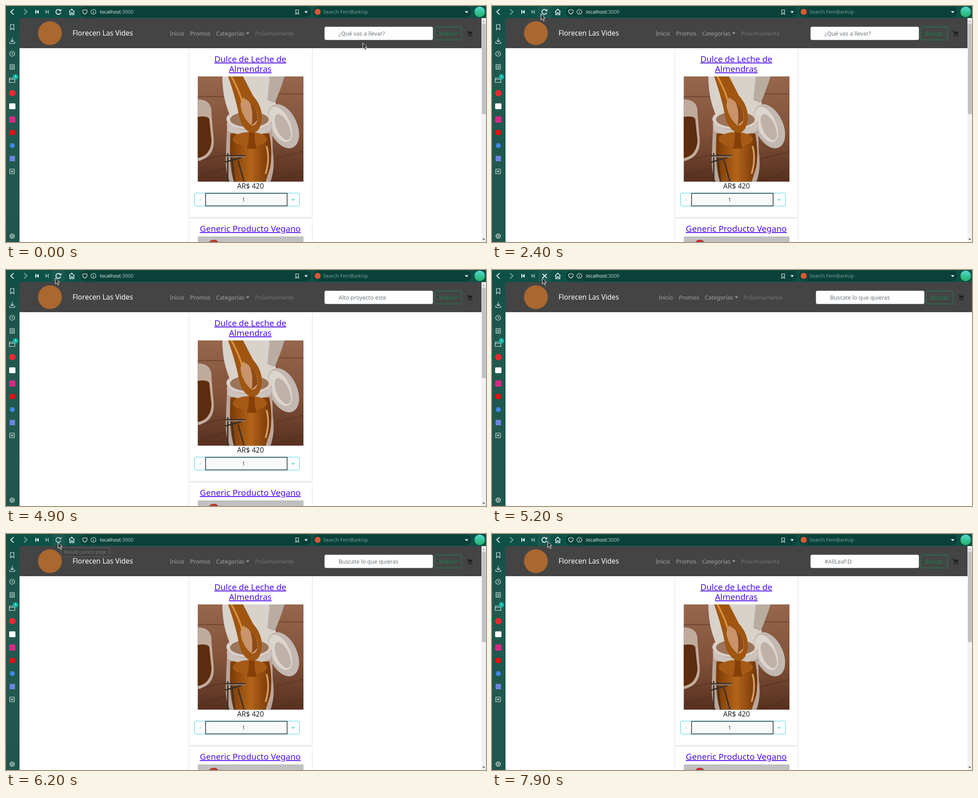
Animation, 1065 px wide and 526 px high, one loop 8 s. Source, as an HTML page:

```html
<!DOCTYPE html>
<html lang="es">
<head>
<meta charset="utf-8">
<title>Tienda</title>
<style>
html, body { margin: 0; width: 100%; height: 100%; overflow: hidden; background: #fff; }
svg { display: block; width: 1065px; height: 526px; }
text { font: 12.48px "Noto Sans", sans-serif; }
.ui { font-size: 10.95px; }
.big { font-size: 15.6px; }
.title { font-size: 18.72px; fill: #4a0bee; text-decoration: underline; }
.mid { text-anchor: middle; }
.line { fill: none; stroke: #e3eeec; stroke-width: 1.2; }
.bold { stroke-width: 2; }
</style>
</head>
<body>
<svg viewBox="0 0 1065 526">
  <defs>
    <linearGradient id="side" x2="0" y2="1"><stop stop-color="#154f48"/><stop offset=".3" stop-color="#22594f"/><stop offset="1" stop-color="#1f564e"/></linearGradient>
    <linearGradient id="wood" x2="0" y2="1"><stop stop-color="#96664d"/><stop offset=".55" stop-color="#805038"/><stop offset="1" stop-color="#55301f"/></linearGradient>
    <linearGradient id="caramel" x2="1" y2="0"><stop stop-color="#7a3905"/><stop offset=".5" stop-color="#b4651a"/><stop offset="1" stop-color="#713407"/></linearGradient>
    <linearGradient id="sky" x2="0" y2="1"><stop stop-color="#55ded0"/><stop offset=".5" stop-color="#36c49a"/><stop offset="1" stop-color="#27b46b"/></linearGradient>
    <clipPath id="frame"><path d="M425.5 157H660V391.5H425.5Z"/></clipPath>
  </defs>
  <rect width="1065" height="526" fill="#fff"/>

  <g id="cards">
    <g fill="#fff" stroke="#dfdfdf">
      <rect x="405.5" y="90.500" width="274" height="381" rx="3"/>
      <rect x="405.500" y="472.500" width="274" height="80" rx="3"/>
    </g>
    <text class="title mid" x="542" y="125">Dulce de Leche de</text>
    <text class="title mid" x="542" y="147">Almendras</text>

    <g clip-path="url(#frame)">
      <rect x="425" y="157" width="236" height="235" fill="url(#wood)"/>
      <g stroke="#4b2b1d" stroke-width="2" opacity=".45">
        <path d="M425 202H490M590 196H660M425 346L490 330M580 345L660 324M595 391L660 366M425 382L490 360"/>
      </g>
      <path d="M480 157H608Q592 200 600 222L588 250H500Q480 210 480 157Z" fill="#d8d2ca"/>
      <path d="M585 157H618Q608 190 596 216L580 210Z" fill="#b9aca0"/>
      <path d="M425 208Q458 208 456 240L461 300Q462 338 425 346Z" fill="#c0aa9b"/>
      <path d="M425 247Q448 244 451 252L456 300Q454 334 425 339Z" fill="#5e2c0e"/>
      <ellipse cx="615" cy="268" rx="31" ry="52" fill="#c2b8b1" transform="rotate(-24 615 268)"/>
      <ellipse cx="609" cy="264" rx="21" ry="42" fill="#ddd6d0" transform="rotate(-24 609 264)"/>
      <ellipse cx="614" cy="270" rx="14" ry="31" fill="#bfb1a7" transform="rotate(-24 614 270)"/>
      <path d="M491 252Q489 302 488 330Q485 370 498 396H585Q598 366 592 325L590 252Z" fill="#b9a599"/>
      <path d="M498 284H584Q592 326 586 360L576 392H506Q494 360 498 284Z" fill="url(#caramel)"/>
      <ellipse cx="540" cy="252" rx="51" ry="23" fill="#d9d0c8"/>
      <ellipse cx="540" cy="253" rx="43" ry="17" fill="#9b745b"/>
      <path d="M490 260Q540 294 591 260L588 278Q540 300 492 278Z" fill="#cdc3bc"/>
      <ellipse cx="541" cy="297" rx="38" ry="16" fill="#a55a16"/>
      <path d="M538 270Q541 300 534 318H556Q549 298 553 270Z" fill="#873f08"/>
      <path d="M493 157H526L548 200Q571 226 567 256Q563 282 546 283Q523 277 516 240Q511 210 493 157Z" fill="#a05510"/>
      <path d="M526 204Q558 222 559 251Q555 270 544 266Q523 248 520 218Z" fill="#c9946b"/>
      <path d="M540 213Q559 230 558 254L545 266Q550 235 540 213Z" fill="#8c4a18"/>
      <path d="M500 157Q518 190 524 214" fill="none" stroke="#d59241" stroke-width="4"/>
      <path d="M486 334H532M492 328V392M500 330L507 392M515 344L528 392M486 348L522 338" fill="none" stroke="#38302d" stroke-width="3"/>
      <path d="M489 336H532" stroke="#a9a5a3" stroke-width="1.500"/>
      <path d="M578 312Q586 340 576 374" fill="none" stroke="#d39a62" stroke-width="4"/>
    </g>

    <text class="big mid" x="542.5" y="406.500" fill="#212529">AR$ 420</text>
    <rect x="418.500" y="417" width="232.500" height="29" rx="3" fill="#fff" stroke="#3fcbe9"/>
    <rect x="442.700" y="417.500" width="181" height="28" fill="#f8f9fa" stroke="#1b3037" stroke-width="1.500"/>
    <text class="mid" x="527" y="436" fill="#43484c">1</text>
    <g class="mid" fill="#0dbde4"><text x="430.500" y="436">-</text><text x="637" y="436">+</text></g>
    <text class="title mid" x="542" y="503">Generic Producto Vegano</text>
    <rect x="425.500" y="513.500" width="234.500" height="13" fill="#c1c0c0"/>
    <ellipse cx="461" cy="528" rx="10" ry="7" fill="#b8322c"/>

    <rect x="1055" y="27" width="10" height="499" fill="#f1f1f1"/>
    <rect x="1056" y="39" width="8.500" height="202" fill="#c1c1c1"/>
    <path d="M1057 35.500L1060 32L1063 35.500Z" fill="#a3a3a3"/>
    <path d="M1057 518.500L1060 522L1063 518.500Z" fill="#505050"/>
  </g>

  <rect id="nav" x="30" y="27" width="1025" height="67" fill="#444"/>
  <circle cx="97.500" cy="60.500" r="26.500" fill="#aa672f"/>
  <text class="big" x="147.500" y="66" fill="#fff">Florecen Las Vides</text>
  <g id="links" fill="#a3a3a3">
    <text x="363.500" y="65.500">Inicio</text>
    <text x="408.500" y="65.500">Promos</text>
    <text x="466" y="65.500">Categorías</text>
    <path d="M532.500 59H540.300L536.400 63Z"/>
    <text x="552.500" y="65.500" fill="#737373">Próximamente</text>
  </g>
  <g id="tools">
    <rect x="707" y="46.500" width="240" height="29" rx="3" fill="#fff" stroke="#ced4da" stroke-width=".8"/>
    <text id="hint" x="738" y="65.500" fill="#6c757d"></text>
    <rect x="951.500" y="46.500" width="59.500" height="29" rx="3" fill="none" stroke="#198754"/>
    <text class="mid" x="981" y="65.500" fill="#198754">Buscar</text>
    <path d="M1022 55H1024.800L1025.300 57H1035.300L1033.800 62.700H1026.500L1026.800 64H1034V65.300H1025.700L1023.700 56.300H1022Z" fill="#202326"/>
    <g fill="#202326"><circle cx="1027" cy="66.500" r="1.500"/><circle cx="1032.700" cy="66.500" r="1.500"/></g>
  </g>

  <rect y="27" width="30" height="499" fill="url(#side)"/>
  <rect width="1065" height="27" fill="#0e5147"/>
  <rect id="hover" x="102" width="28.500" height="26" fill="#19594f"/>
  <g fill="#0a4139">
    <rect x="164" y="2" width="513" height="22.500" rx="11"/>
    <rect x="681" y="2" width="351.500" height="22.500" rx="11"/>
  </g>
  <g class="line bold">
    <path d="M17 7L10.500 13L17 19"/>
    <path d="M40 7L46.500 13L40 19" opacity=".55"/>
    <path d="M140 13L146 7L152 13M141.500 12V19.500H144.500V15H147.500V19.500H150.500V12" stroke-width="1.600"/>
    <path id="stop" d="M112 8.500L121.500 18M121.500 8.500L112 18"/>
    <g id="reload"><path d="M120 9.300A5.400 5.400 0 1 0 121.400 14.500"/><path d="M122.700 6.500V11.700H117.500Z" fill="#e3eeec" stroke="none"/></g>
  </g>
  <g fill="#e3eeec">
    <path d="M65 8.500H67V17.500H65ZM72.500 8.500V17.500L67 13Z"/>
    <path d="M93 8.500H95V17.500H93ZM87.500 8.500V17.500L93 13Z" opacity=".55"/>
    <path d="M662 11.500H670L666 16ZM1018 11.500H1026L1022 16Z"/>
    <text class="ui" x="208.500" y="17">localhost<tspan fill="#a9c4bf">:3000</tspan></text>
    <text class="ui" x="704" y="17" fill="#7fa099">Search FernBarkUp</text>
  </g>
  <g class="line">
    <path d="M175 8Q178 9.500 180 9.500Q181 15 175 18.500Q169 15 170 9.500Q172 9.500 175 8Z"/>
    <circle cx="194" cy="13" r="5.500"/><path d="M194 12V16.500M194 9.500V10.800"/>
    <path d="M643 8.500H649V18.500L646 15.500L643 18.500Z"/>
    <path d="M10 41.500H17.500V53L13.700 49.500L10 53Z"/>
    <path d="M14 71V79.500M10.500 76.500L14 80L17.500 76.500M8.500 79.500V83.500H19.500V79.500"/>
    <circle cx="13.700" cy="106.500" r="5.500"/><path d="M13.700 103V107L16 108"/>
    <path d="M9 130.500H18.500V141H9ZM11 133.500H16.500M11 136H16.500M11 138.500H16.500"/>
    <path d="M7.500 160.500H19.500V170.500H7.500ZM7.500 163.500H19.500"/>
    <path d="M8.500 363.500H18.500V374H8.500ZM13.500 366V371.500M10.800 368.700H16.200"/>
    <circle cx="13.700" cy="513" r="4.300"/><circle cx="13.700" cy="513" r="1.500"/>
    <circle cx="13.700" cy="513" r="5.300" stroke-dasharray="2 2.160"/>
  </g>
  <circle cx="21" cy="158" r="6" fill="#09b5a3"/>
  <text class="mid" x="21" y="161" fill="#fff" style="font-size:8px">1</text>
  <circle cx="14" cy="194" r="7" fill="#ef2930"/>
  <rect x="7" y="217" width="14" height="13" rx="2" fill="#fff"/>
  <rect x="7" y="246" width="14" height="14" rx="3" fill="#d32c83"/>
  <rect x="8.500" y="276.500" width="11" height="11" rx="2" fill="#f50b0b"/>
  <circle cx="14" cy="311" r="5.500" fill="#3f88e5"/>
  <rect x="8" y="334" width="12" height="12" rx="1" fill="#6b84df"/>
  <circle cx="691.500" cy="13" r="6.700" fill="#de5833"/>
  <circle cx="1051" cy="13" r="11.500" fill="url(#sky)"/>

  <g id="tip">
    <rect x="122.500" y="30.500" width="106" height="20" fill="#3f4141" stroke="#646464"/>
    <text x="128" y="44" fill="#777" style="font-size:9.930px">Reload current page</text>
  </g>
  <path id="arrow" d="M.5 .5V14L3.500 11.300L6 16.500L8.300 15.400L5.900 10.300H10Z" fill="#303030" stroke="#f4f4f4"/>
  <g id="beam" fill="none">
    <path d="M-3 -6.500H-1L0 -5.500L1 -6.500H3M0 -5.500V5.500M-3 6.500H-1L0 5.500L1 6.500H3" stroke="#fff" stroke-width="2.500"/>
    <path d="M-3 -6.500H-1L0 -5.500L1 -6.500H3M0 -5.500V5.500M-3 6.500H-1L0 5.500L1 6.500H3" stroke="#303030"/>
  </g>
</svg>
<script>
const $ = id => document.getElementById(id);
const show = (id, on) => $(id).setAttribute('visibility', on ? 'visible' : 'hidden');
const move = (id, x, y = 0) => $(id).setAttribute('transform', `translate(${x} ${y})`);
const within = (t, ...spans) => spans.some(([from, to]) => t >= from && t < to);

// Pointer: time, x, y; sampled every 100 ms
const path = [
  [0, 791, 82], [500, 853, 81], [900, 785, 66], [1000, 728, 59], [1100, 728, 59],
  [1200, 762, 59], [1300, 802, 62], [1400, 760, 59], [1900, 96, 15], [2000, 112, 14],
  [2200, 124, 23], [2400, 108, 17], [3900, 108, 17], [4000, 109, 17], [5100, 109, 17],
  [5200, 111, 17], [5400, 111, 17], [5500, 115, 18], [6500, 115, 18], [6600, 122, 16],
  [7100, 122, 16], [7200, 123, 16], [8000, 123, 16]
];
const hints = [[6800, '#AllLeaf:D'], [5200, 'Buscate lo que quieras'],
  [3700, 'Alto proyecto este'], [0, '¿Qué vas a llevar?']];

function pointer(t) {
  const i = path.findIndex(p => p[0] > t);
  const [a, b] = [path[i - 1], path[i]];
  const k = (t - a[0]) / (b[0] - a[0]);
  return [1, 2].map(n => Math.round(a[n] + (b[n] - a[n]) * k));
}

function draw(now) {
  const t = Math.floor(now % 8000 / 100) * 100;
  const [x, y] = pointer(t);
  const blank = within(t, [5200, 5500]);
  const busy = within(t, [3700, 4600], [5200, 6200], [6600, 7000]);
  const fading = within(t, [4600, 4900], [6200, 6600], [7000, 7900]);
  const typing = x > 707 && x < 947 && y > 46 && y < 76;

  $('hint').textContent = hints.find(h => t >= h[0])[1];
  show('cards', !blank);
  $('nav').setAttribute('width', blank ? 1035 : 1025);
  move('links', blank ? 6 : 0);
  move('tools', blank ? 12 : 0);
  show('stop', busy);
  show('reload', !busy);
  $('reload').setAttribute('opacity', fading ? .75 : 1);
  show('hover', x > 101 && x < 131 && y < 27);
  show('tip', within(t, [6200, 6600]));
  show('arrow', !typing);
  show('beam', typing);
  move('arrow', x, y);
  move('beam', x, y);
}

const start = performance.now();
(function loop() {
  draw(performance.now() - start);
  requestAnimationFrame(loop);
})();
</script>
</body>
</html>
```
